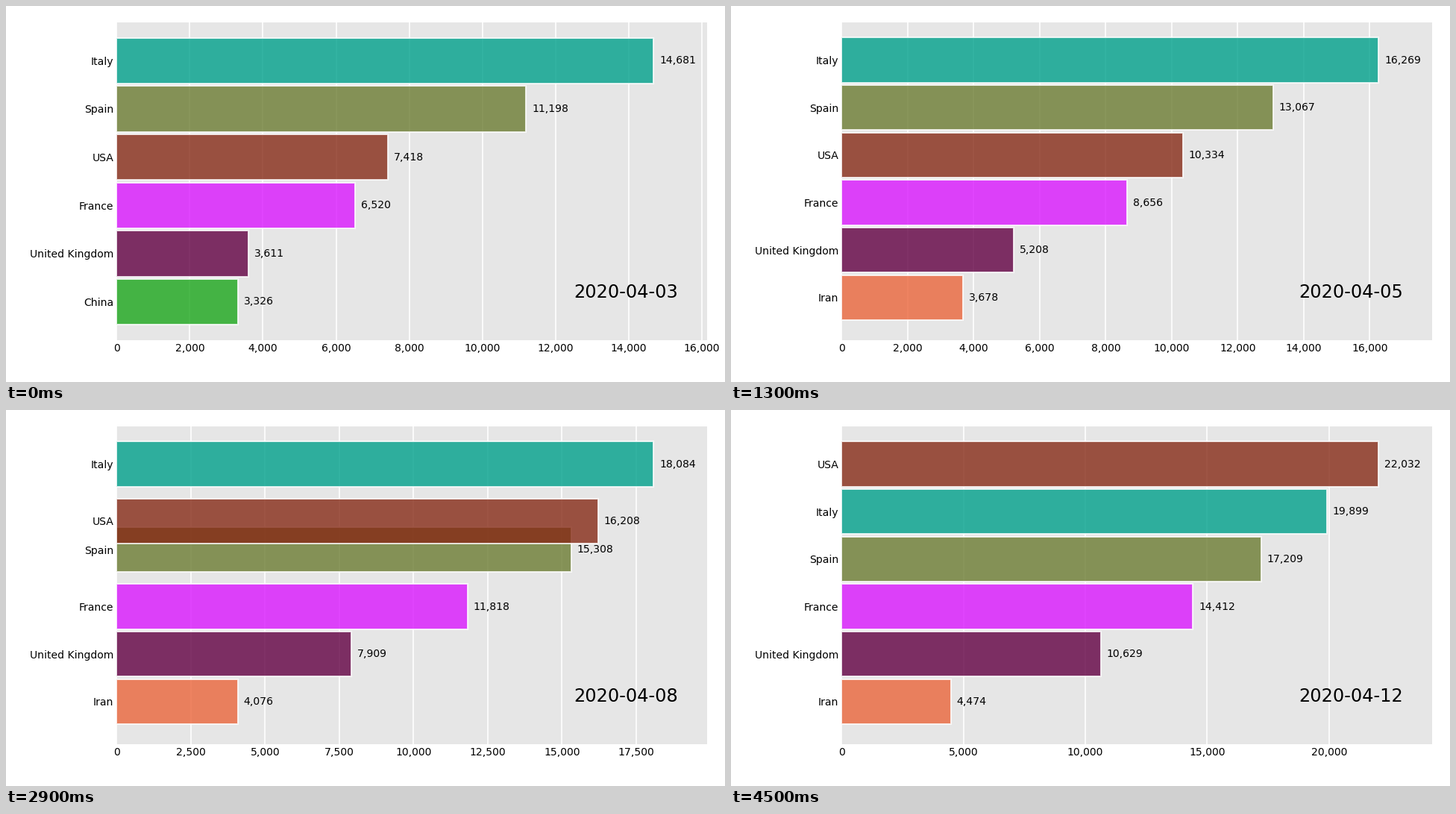
A matplotlib script for the animation above (4.55 s loop, 964 px wide and 504 px high).

```python
import numpy as np
import matplotlib.pyplot as plt
from matplotlib.animation import FuncAnimation
from matplotlib.ticker import StrMethodFormatter

W, H, DPI = 964, 504, 144
STEPS = 10          # frames per day
DAYS = 10
FIRST_DAY = 3
N_BARS = 6
LABEL_GAP = 0.01    # share of the axis between a bar and its value
FONT = 7

# name: (colour, {day: total}); totals grow evenly between these turning points
COUNTRIES = {
    "China": ("#1CA71C", {0: 3326, 9: 3343}),
    "France": ("#DA16FF", {0: 6520, 1: 7574, 3: 8926, 4: 10343, 5: 10887, 7: 13215, 9: 14412}),
    "Iran": ("#EB663B", {0: 3294, 2: 3603, 9: 4474}),
    "Italy": ("#00A08B", {0: 14681, 1: 15362, 9: 19899}),
    "Spain": ("#6C7C32", {0: 11198, 5: 14792, 7: 16081, 9: 17209}),
    "USA": ("#862A16", {0: 7418, 3: 10783, 8: 20471, 9: 22032}),
    "United Kingdom": ("#620042", {0: 3611, 2: 4943, 3: 5385, 8: 9892, 9: 10629}),
}

names = np.array(list(COUNTRIES))
colors = np.array([color for color, _ in COUNTRIES.values()])
totals = np.array([np.interp(range(DAYS), list(keys), list(keys.values()))
                   for _, keys in COUNTRIES.values()]).T
# Slot 0 is just below the chart, slot N_BARS is the leader.
slots = totals.argsort(axis=1).argsort(axis=1) - (len(names) - N_BARS - 1)
slots = slots.clip(min=0)

plt.rcParams["font.family"] = "DejaVu Sans"
# The tiny surplus keeps the pixel width from rounding down.
fig = plt.figure(figsize=((W + 0.001) / DPI, H / DPI), dpi=DPI, facecolor="white")
left, right, top, bottom = 148.34, 940.25, 21.6, 448.2
ax = fig.add_axes([left / W, 1 - bottom / H, (right - left) / W, (bottom - top) / H])
ax.set_facecolor("0.9")
ax.set_axisbelow(True)
ax.grid(True, axis="x", color="white", linewidth=0.8)
ax.tick_params(length=0, labelsize=FONT, pad=2)
ax.xaxis.set_major_formatter(StrMethodFormatter("{x:,.0f}"))
ax.spines[:].set_visible(False)

date = ax.text(0.95, 0.15, "", transform=ax.transAxes, size=12, ha="right", va="center")
value_texts = []


def between_days(table, frame):
    day, step = divmod(frame, STEPS)
    after = min(day + 1, DAYS - 1)
    return table[day] + (table[after] - table[day]) * step / STEPS


def draw(frame):
    for bars in list(ax.containers):
        bars.remove()
    while value_texts:
        value_texts.pop().remove()

    slot = between_days(slots, frame)
    shown = slot > 0
    slot = slot[shown]
    length = between_days(totals, frame)[shown]
    x_max = length.max() * 1.1

    ax.barh(slot, length, height=0.95, color=colors[shown], ec="white",
            linewidth=1, alpha=0.8)
    ax.set_yticks(slot, names[shown])
    ax.set_xlim(0, x_max)
    # The view grows slightly as soon as a bar enters from below.
    ax.set_ylim(0.1 if frame else 0.2, N_BARS + 0.8)

    for x, y in zip(length, slot):
        value_texts.append(ax.text(x + LABEL_GAP * x_max, y, f"{x:,.0f}",
                                   size=FONT, ha="left", va="center"))
    date.set_text(f"2020-04-{FIRST_DAY + frame // STEPS:02d}")


anim = FuncAnimation(fig, draw, frames=(DAYS - 1) * STEPS + 1, interval=50, repeat=True)
plt.show()
```
